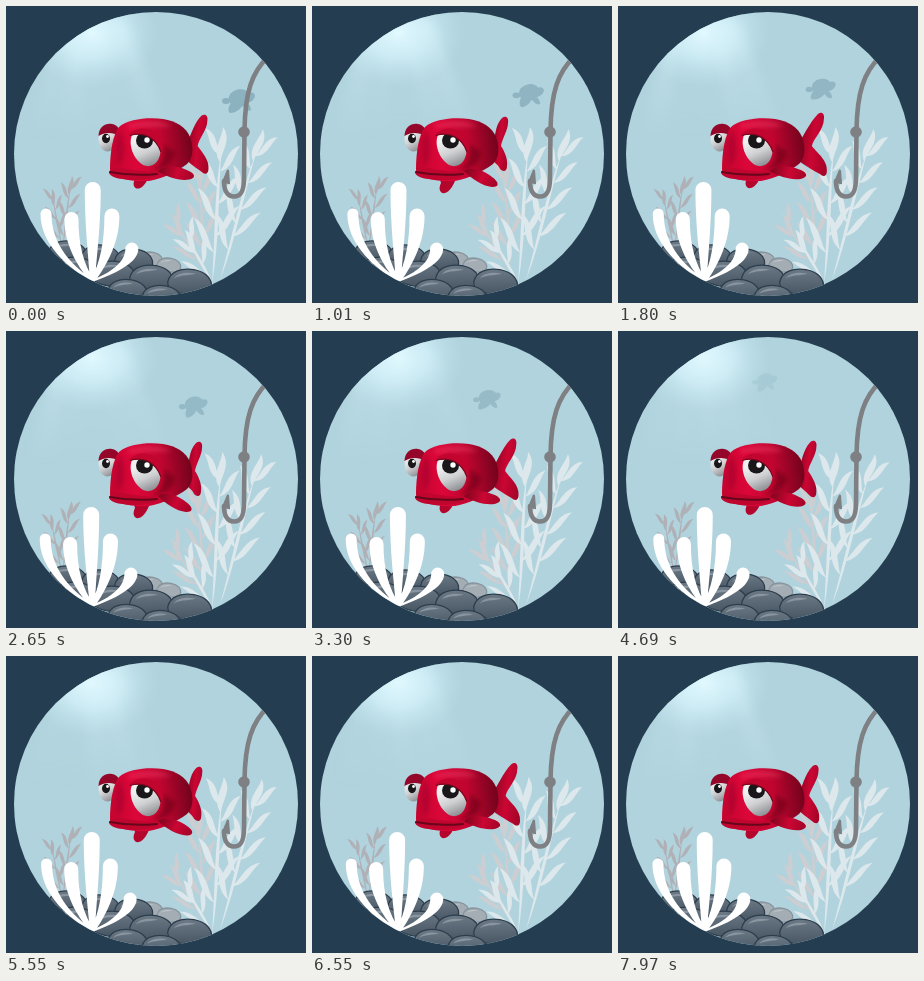
Animation, 300 px wide and 297 px high, one loop 8 s. Source, as an HTML page:

```html
<!DOCTYPE html>
<html lang="en">
<head>
<meta charset="utf-8">
<title>Sad fish</title>
<style>
html, body { margin: 0; width: 100%; height: 100%; overflow: hidden; background: #253d50; }
svg { display: block; width: 100%; height: 100%; }
</style>
</head>
<body>
<svg viewBox="0 0 300 297">
  <defs>
    <clipPath id="port"><circle cx="150" cy="148" r="142"/></clipPath>
    <radialGradient id="glow">
      <stop offset="0" stop-color="#e2f9ff"/>
      <stop offset=".45" stop-color="#d3f1fa" stop-opacity=".75"/>
      <stop offset="1" stop-color="#c0e4ee" stop-opacity="0"/>
    </radialGradient>
    <linearGradient id="ray" gradientUnits="userSpaceOnUse" x1="0" y1="20" x2="0" y2="130">
      <stop offset="0" stop-color="#dcf6fd" stop-opacity=".6"/>
      <stop offset="1" stop-color="#d8f2fa" stop-opacity="0"/>
    </linearGradient>
    <linearGradient id="skin" x1="0" y1=".6" x2="1" y2=".5">
      <stop offset="0" stop-color="#c5042f"/>
      <stop offset=".3" stop-color="#dc0639"/>
      <stop offset=".65" stop-color="#be0530"/>
      <stop offset="1" stop-color="#72031c"/>
    </linearGradient>
    <linearGradient id="fin" x1="0" y1=".3" x2="1" y2=".6">
      <stop offset="0" stop-color="#85051f"/>
      <stop offset=".55" stop-color="#cb0633"/>
      <stop offset="1" stop-color="#a80429"/>
    </linearGradient>
    <linearGradient id="eye" x1=".2" y1="0" x2=".6" y2="1">
      <stop offset=".2" stop-color="#f0f0f0"/>
      <stop offset=".6" stop-color="#cfd0d2"/>
      <stop offset="1" stop-color="#8f9195"/>
    </linearGradient>
    <linearGradient id="stone" x1=".3" y1="0" x2=".6" y2="1">
      <stop offset="0" stop-color="#6d7b87"/>
      <stop offset="1" stop-color="#475563"/>
    </linearGradient>
    <filter id="soft" x="-30%" y="-30%" width="160%" height="160%"><feGaussianBlur stdDeviation="5"/></filter>
    <filter id="shade" x="-50%" y="-50%" width="200%" height="200%"><feGaussianBlur stdDeviation="2"/></filter>
  </defs>
  <g clip-path="url(#port)">
    <rect width="300" height="297" fill="#b0d3dd"/>
    <ellipse cx="86" cy="27" rx="66" ry="54" fill="url(#glow)"/>
    <g id="rays" fill="url(#ray)" filter="url(#soft)"></g>
    <g id="turtle" fill="#86abba">
      <ellipse cx="1" cy="-2" rx="11" ry="8.500" transform="rotate(-12)"/>
      <ellipse cx="-13" cy="1" rx="4" ry="3"/>
      <path id="flipper" d="M-8 3C-10 6-12 11-9 13C-4 13 1 10 4 5Z"/>
      <path d="M7-5C11-9 16-8 16-4C15 1 10 3 7 3ZM3 5C6 10 10 12 12 10C12 6 9 3 7 2Z"/>
    </g>
    <path id="pinkWeed" fill="#ccced1"/>
    <path id="leftWeed" fill="#b0b1b6"/>
    <path id="whiteWeed" fill="#dde8ec"/>
    <g fill="none" stroke="#7e8084" stroke-width="4.600" stroke-linecap="round">
      <path d="M262 51C246 66 239 86 238.500 125L238 172C238 185 235 190.500 228 190.500C221 190.500 218 184 218 175"/>
      <circle cx="238" cy="126" r="3.500" fill="#7e8084"/>
      <path d="M222 164L217 176L223 177Z" fill="#7e8084" stroke-width="2"/>
    </g>
    <g id="rocks"></g>
    <path id="coral" fill="#fff"/>
  </g>
  <g id="fish">
    <path id="tail" fill="url(#fin)"/>
    <path id="belly" d="M127 170H145C142 178 138 186 133 187C128 188 126 183 129 177Z" fill="#b4052d"/>
    <ellipse cx="101.500" cy="133" rx="9" ry="12.500" fill="url(#eye)"/>
    <ellipse cx="100" cy="132.500" rx="4" ry="4.700" fill="#191719"/>
    <circle cx="101.500" cy="130.500" r="1.400" fill="#fff"/>
    <path d="M92.500 130C93 121 99 117 106 118C112 119 115 124 114 130C106 126 99 126 92.500 130Z" fill="#94062a"/>
    <path d="M104 163C104 146 107 128 113 121C122 113 142 111 157 113C170 115 180 121 184 131
      C188 142 187 152 181 158C170 166 158 172 143 175C125 176 104 172 104 163Z" fill="url(#skin)"/>
    <g filter="url(#shade)">
      <path d="M114 124C120 134 120 154 112 160C109 150 109 132 114 124Z" fill="#95042a" opacity=".45"/>
      <path d="M157 138C160 152 155 161 145 164C158 165 168 158 169 146Z" fill="#6a0319" opacity=".6"/>
      <path d="M122 119C136 113 155 114 166 120C153 122 137 120 122 122Z" fill="#f3476c" opacity=".4"/>
    </g>
    <path d="M103 167C105 161 112 161 121 163C133 165 146 166 154 166C149 172 142 174 130 174C117 174 105 172 103 167Z" fill="#c0052f"/>
    <path d="M104 166C114 168 130 170 151 168" fill="none" stroke="#65061a" stroke-width="2" stroke-linecap="round"/>
    <path d="M126 129C122 138 127 153 137 159C146 163 154 156 154.500 145C152 135 142 126 126 129Z" fill="url(#eye)"/>
    <ellipse cx="138.500" cy="134.500" rx="8.500" ry="8" fill="#191719"/>
    <circle cx="141" cy="134" r="2.700" fill="#fff"/>
    <path d="M122 130C128 121 142 120 151 127C156 131 158 138 156 147C151 136 143 129 134 128C129 127.500 126 128 122 130Z" fill="#c2052f"/>
    <path d="M124 129.500C138 125 150 132 155 146" fill="none" stroke="#7b051d" stroke-width="1.200"/>
    <path id="side" d="M152 165C158 160 172 164 180 171C187 176 188 181 180 181C170 180 160 173 152 165Z" fill="url(#fin)"/>
  </g>
</svg>
<script>
const LOOP = 8000, BEAT = 1600, TAU = 2 * Math.PI;
const $ = id => document.getElementById(id);
const set = (id, name, value) => $(id).setAttribute(name, value);
const mix = (a, b, k) => a + (b - a) * k;
const times = (n, make) => Array.from({ length: n }, (_, i) => make(i));

// A slender S-shaped leaf of half width w; bend is 1 or -1.
function leaf(x, y, dx, dy, w, bend) {
  const len = Math.hypot(dx, dy);
  const at = (k, side) => `${x + dx * k - dy / len * w * side} ${y + dy * k + dx / len * w * side}`;
  const b = bend * .7;
  return `M${x} ${y}C${at(.33, b + .7)} ${at(.67, .7 - b)} ${at(1, 0)}C${at(.67, -b - .7)} ${at(.33, b - .7)} ${x} ${y}Z`;
}

// A stem with leaves on alternating sides, shorter towards the top.
function stem(x, y, tipX, tipY, count, size, sway) {
  const dx = tipX - x + sway, dy = tipY - y, angle = Math.atan2(dy, dx);
  const leaves = times(count, i => {
    const u = .2 + .62 * i / (count - 1), side = i % 2 ? 1 : -1;
    const a = angle + side * .6, len = size * (1.2 - .4 * u);
    return leaf(x + dx * u, y + dy * u, len * Math.cos(a), len * Math.sin(a), size * .17, side);
  });
  const top = 1 - size / Math.hypot(dx, dy);
  return leaf(x, y, dx * .85, dy * .85, size * .09, 1) + leaves.join("")
    + leaf(x + dx * top, y + dy * top, dx * (1 - top), dy * (1 - top), size * .2, -1);
}

// A rounded coral finger that tapers towards the shared root.
function finger(x, y, w, sway) {
  x += sway;
  const r = w / 2, lowX = mix(86, x, .6), lowY = mix(274, y, .25), highY = mix(274, y, .6);
  return `M84 275C${lowX - r * .5} ${lowY} ${x - r} ${highY} ${x - r} ${y}A${r} ${r} 0 0 1 ${x + r} ${y}
    C${x + r} ${highY} ${lowX + r * .5} ${lowY} 89 275Z`;
}

function stone(x, y, rx, ry, pale) {
  const [fill, edge, shine] = pale ? ["#a3adb3", "#87949d", "#bec6ca"] : ["url(#stone)", "#2d3d4c", "#8995a0"];
  return `<g transform="translate(${x} ${y}) rotate(8) scale(${rx} ${ry})">
    <path d="M-1 .2C-.95-.6-.5-1 .1-1C.7-.95 1-.4 1 .2C.9.8.4 1-.1 1C-.7 1-1 .7-1 .2Z"
      fill="${fill}" stroke="${edge}" stroke-width="1.300" vector-effect="non-scaling-stroke"/>
    <path d="M-.75-.1C-.6-.6-.2-.75.2-.72C0-.5-.45-.5-.75-.1Z" fill="${shine}"/></g>`;
}
const row = (n, x, y, dx, dy, rx, pale) =>
  times(n, i => stone(x + dx * i, y + dy * i, rx, rx * .58, pale)).join("");

$("rocks").innerHTML = row(2, 145, 253, 18, 6, 12, true) + row(3, 62, 246, 33, 4, 19)
  + row(4, 70, 264, 38, 4, 22) + row(2, 122, 285, 34, 6, 20);
$("rays").innerHTML = times(5, i => `<path d="M${50 + 14 * i} 15h14L${50 + 29 * i} 130h-26Z"/>`).join("");

function drawPlants(turn) {
  const sway = i => .9 * Math.sin(turn * 2 + i);
  set("whiteWeed", "d", stem(206, 278, 217, 121, 7, 36, sway(0))
    + stem(214, 274, 256, 123, 8, 34, sway(1)) + stem(208, 282, 178, 224, 4, 28, sway(2)));
  set("pinkWeed", "d", stem(198, 262, 193, 156, 7, 28, sway(1)) + stem(197, 264, 165, 208, 4, 25, sway(2)));
  set("leftWeed", "d", stem(56, 245, 66, 170, 6, 20, sway(0)) + stem(56, 245, 45, 183, 5, 18, sway(1)));
  set("coral", "d", finger(40, 208, 11, sway(0)) + finger(65, 213, 14, sway(.5)) + finger(86, 184, 16, sway(1))
    + finger(105, 210, 15, sway(1.5)) + finger(125, 243, 13, sway(2)));
}

function drawTurtle(s) {
  set("turtle", "transform",
    `translate(${233 - 15.5 * s - .6 * s * s} ${94 - 4.6 * s - s * s}) scale(${1 - .05 * s})`);
  set("turtle", "opacity", Math.max(0, Math.min(.85 - .08 * s, (5.2 - s) * .4)));
  set("flipper", "transform", `rotate(${14 * Math.sin(s * 3.9)} -4 4)`);
}

function drawFish(t) {
  const beat = (1 + Math.cos(TAU * (t - 230) / BEAT)) / 2;
  const swing = beat ** 3, lift = beat * beat * (3 - 2 * beat);
  const top = mix(196, 206, swing), low = mix(195, 209, swing), notch = mix(189, 194, swing);
  const topY = mix(112, 108, swing), lowY = mix(163, 168, swing);
  set("tail", "d", `M180 138C184 133 ${top - 14} ${topY + 8} ${top - 6} ${topY}C${top - 2} ${topY - 3} ${top + 1} ${topY} ${top} ${topY + 5}
    C${top} 124 ${notch + 1} 133 ${notch} 140C${notch + 4} 146 ${low + 1} 154 ${low} ${lowY - 3}
    C${low} ${lowY + 3} ${low - 4} ${lowY + 3} ${low - 7} ${lowY}C187 160 183 156 179 154Z`);
  set("side", "transform", `rotate(${-17 * lift} 154 165)`);
  set("belly", "transform", `translate(0 ${-5 * lift})`);
}

function draw(t) {
  const turn = TAU * t / LOOP;
  [...$("rays").children].forEach((ray, i) => ray.setAttribute("opacity", .4 + .25 * Math.sin(turn * (1 + i % 2) + i * 1.8)));
  drawPlants(turn);
  drawTurtle(t / 1000);
  drawFish(t);
}

const start = performance.now();
function tick() {
  draw((performance.now() - start) % LOOP);
  requestAnimationFrame(tick);
}
tick();
</script>
</body>
</html>
```
